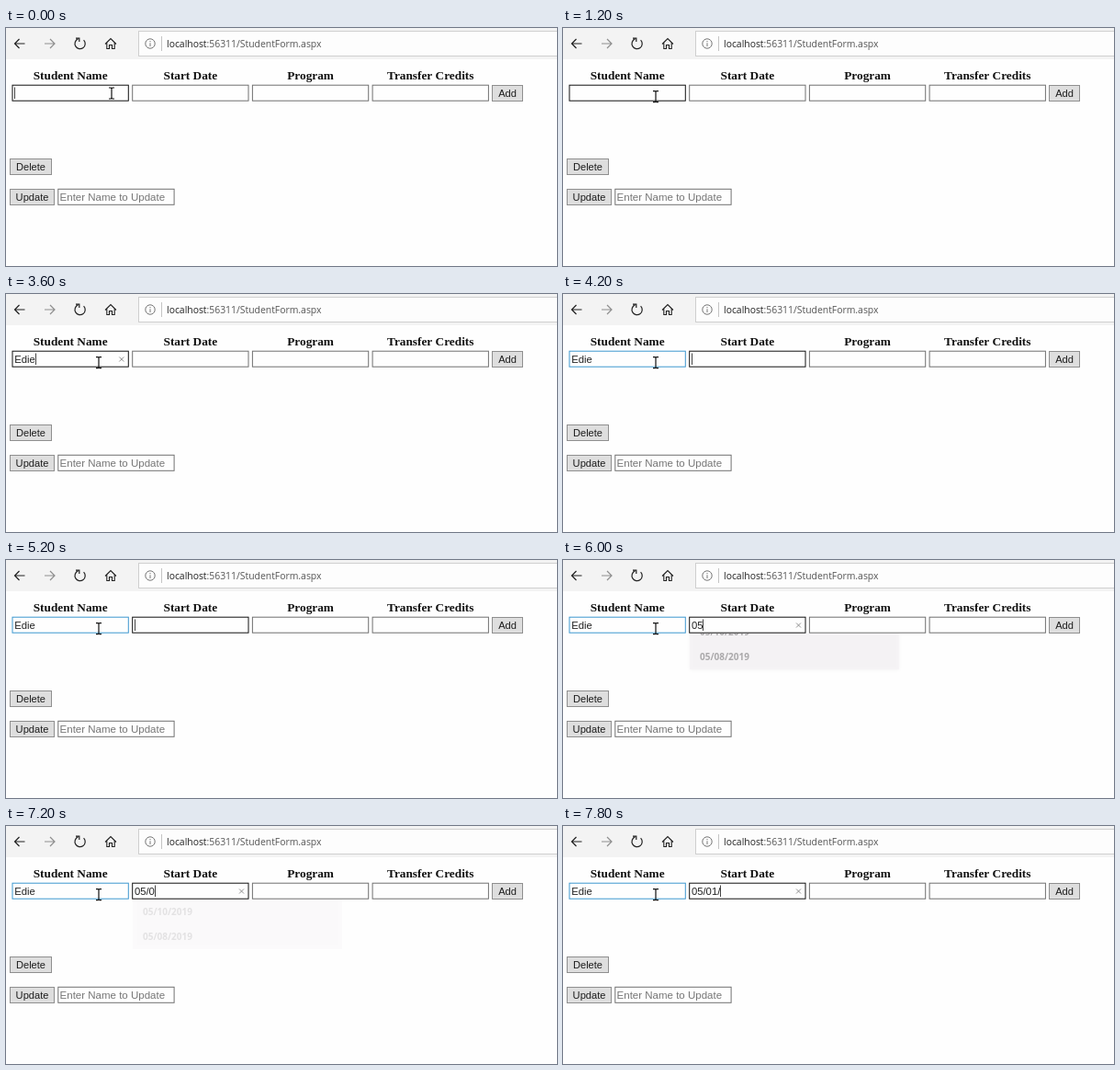
An HTML page with a canvas for the animation above (8 s loop, 600 px wide and 259 px high).

```html
<!DOCTYPE html>
<html lang="en">
<head>
<meta charset="utf-8">
<title>Student form</title>
<style>
  html, body { margin: 0; width: 100%; height: 100%; overflow: hidden; background: #fefefe; }
  canvas { display: block; width: 600px; height: 259px; }
</style>
</head>
<body>
<canvas id="stage" width="600" height="259"></canvas>
<script>
const ctx = document.getElementById('stage').getContext('2d');
const LOOP = 8000, STEP = 200, BLINK = 530;
const SANS = '"Liberation Sans", Arial, sans-serif';
const SERIF = '"Liberation Serif", "Times New Roman", serif';
const UI = '"Open Sans", "Noto Sans", sans-serif';
const INPUT_FONT = '11.3px ' + SANS;
const FIELD = { x: 6.5, y: 61.7, w: 127.3, h: 18, pitch: 130.7 };

// Key presses: [time, field, value after the press]
const keys = [
  [-460, 0, ''],
  [1550, 0, 'E'], [1750, 0, 'Ed'], [1950, 0, 'Edi'], [2070, 0, 'Edie'],
  [4130, 1, ''],
  [5500, 1, '0'], [5900, 1, '05'], [6270, 1, '05/'], [7130, 1, '05/0'], [7700, 1, '05/01/']
];
const columns = ['Student Name', 'Start Date', 'Program', 'Transfer Credits'];

const clamp = v => Math.max(0, Math.min(1, v));
const easeOut = v => 1 - (1 - clamp(v)) ** 3;

function text(str, x, y, font, color, align = 'left') {
  ctx.font = font;
  ctx.fillStyle = color;
  ctx.textAlign = align;
  ctx.fillText(str, x, y);
}

function box(x, y, w, h, fill, stroke) {
  ctx.fillStyle = fill;
  ctx.fillRect(x, y, w, h);
  ctx.strokeStyle = stroke;
  ctx.lineWidth = 1;
  ctx.strokeRect(x + 0.5, y + 0.5, w - 1, h - 1);
}

function path(d, color, width = 1) {
  ctx.strokeStyle = color;
  ctx.lineWidth = width;
  ctx.stroke(new Path2D(d));
}

function button(label, x, y, w) {
  box(x, y, w, 18, '#dedede', '#8f8f8f');
  text(label, x + w / 2, y + 13, '11.1px ' + SANS, '#1c1c1c', 'center');
}

function toolbar() {
  ctx.fillStyle = '#f3f3f3';
  ctx.fillRect(0, 0, 600, 34);
  box(144, 3, 460, 28, '#fdfdfd', '#cfcfcf');

  path('M20.5 17H9.5M14.5 12L9.5 17L14.5 22', '#222', 1.2);
  path('M42 17H53M48 12L53 17L48 22', '#8f8f8f', 1.2);
  path('M84.6 13.1A5.6 5.6 0 1 1 78.4 11.9M76 11.2H79.8V15', '#222', 1.2);
  path('M108 17.5L114 11.5L120 17.5M109.8 16V22.5H112.5V18.5H115.5V22.5H118.2V16', '#222', 1.1);

  ctx.beginPath();
  ctx.arc(157, 17, 5.2, 0, 7);
  ctx.strokeStyle = '#777';
  ctx.lineWidth = 1;
  ctx.stroke();
  path('M157 14V15.2M157 16.3V20', '#777');
  path('M169.5 9V25', '#c4c4c4');

  const font = '10.4px ' + UI, host = 'localhost';
  text(host, 175, 20.5, font, '#222');
  text(':56311/StudentForm.aspx', 175 + ctx.measureText(host).width, 20.5, font, '#555');
}

function suggestions(t) {
  const open = easeOut((t - 5850) / 500);
  const alpha = open * (1 - clamp((t - 7050) / 250));
  if (alpha <= 0) return;
  const shift = -43 * (1 - open);
  ctx.save();
  ctx.beginPath();
  ctx.rect(130, 80, 245, 65);
  ctx.clip();
  ctx.globalAlpha = alpha;
  ctx.shadowColor = `rgba(0,0,0,${0.32 * alpha ** 4})`;
  ctx.shadowBlur = 4;
  ctx.shadowOffsetY = 1;
  ctx.fillStyle = '#f4f2f5';
  ctx.fillRect(138, 70 + shift, 228, 64);
  ctx.shadowColor = 'transparent';
  ctx.globalAlpha = alpha ** 2.5;
  ['05/10/2019', '05/08/2019'].forEach((date, i) =>
    text(date, 149, 97 + 26.5 * i + shift, 'bold 10px ' + UI, '#222'));
  ctx.restore();
}

function form(t) {
  const values = ['', '', '', ''];
  let pressed = 0, focus = 0;
  for (const [at, field, value] of keys) {
    if (at > t) break;
    pressed = at;
    focus = field;
    values[field] = value;
  }

  columns.forEach((title, i) => {
    const left = FIELD.x + FIELD.pitch * i, active = i === focus;
    text(title, left + FIELD.w / 2, 56, 'bold 13.3px ' + SERIF, '#111', 'center');
    box(left, FIELD.y, FIELD.w, FIELD.h, '#fefefe', active ? '#111' : i === 0 ? '#3c97cf' : '#707070');
    text(values[i], left + 2.7, 75, INPUT_FONT, '#222');
    if (!active) return;
    const end = Math.floor(left + 3 + ctx.measureText(values[i]).width);
    if (Math.floor((t - pressed) / BLINK) % 2 === 0) {
      ctx.fillStyle = '#444';
      ctx.fillRect(end, 64.5, 1, 12.5);
    }
    if (values[i]) {
      const cx = left + 119.3;
      path(`M${cx - 2.5} 68.5l5 5m0 -5l-5 5`, '#858585', 0.9);
    }
  });

  button('Add', 529, 62, 34);
  button('Delete', 4, 142, 46);
  button('Update', 4, 175, 49);
  box(56.3, 174.8, FIELD.w, FIELD.h, '#fefefe', '#707070');
  text('Enter Name to Update', 58.6, 188, '11.5px ' + SANS, '#757575');
}

function pointer(t) {
  const k = easeOut((t - 50) / 550);
  const x = 115 - 14 * k, y = 65 + 3.7 * k;
  path(`M${x - 3} ${y}h2.2l0.8 0.8l0.8 -0.8h2.2M${x} ${y + 0.8}v10.4` +
       `M${x - 3} ${y + 12}h2.2l0.8 -0.8l0.8 0.8h2.2`, '#111', 1.2);
}

function draw(now) {
  const t = Math.floor(now % LOOP / STEP) * STEP;
  ctx.fillStyle = '#fefefe';
  ctx.fillRect(0, 0, 600, 259);
  toolbar();
  form(t);
  suggestions(t);
  pointer(t);
}

const start = performance.now();
function tick() {
  draw(performance.now() - start);
  requestAnimationFrame(tick);
}
tick();
</script>
</body>
</html>
```
